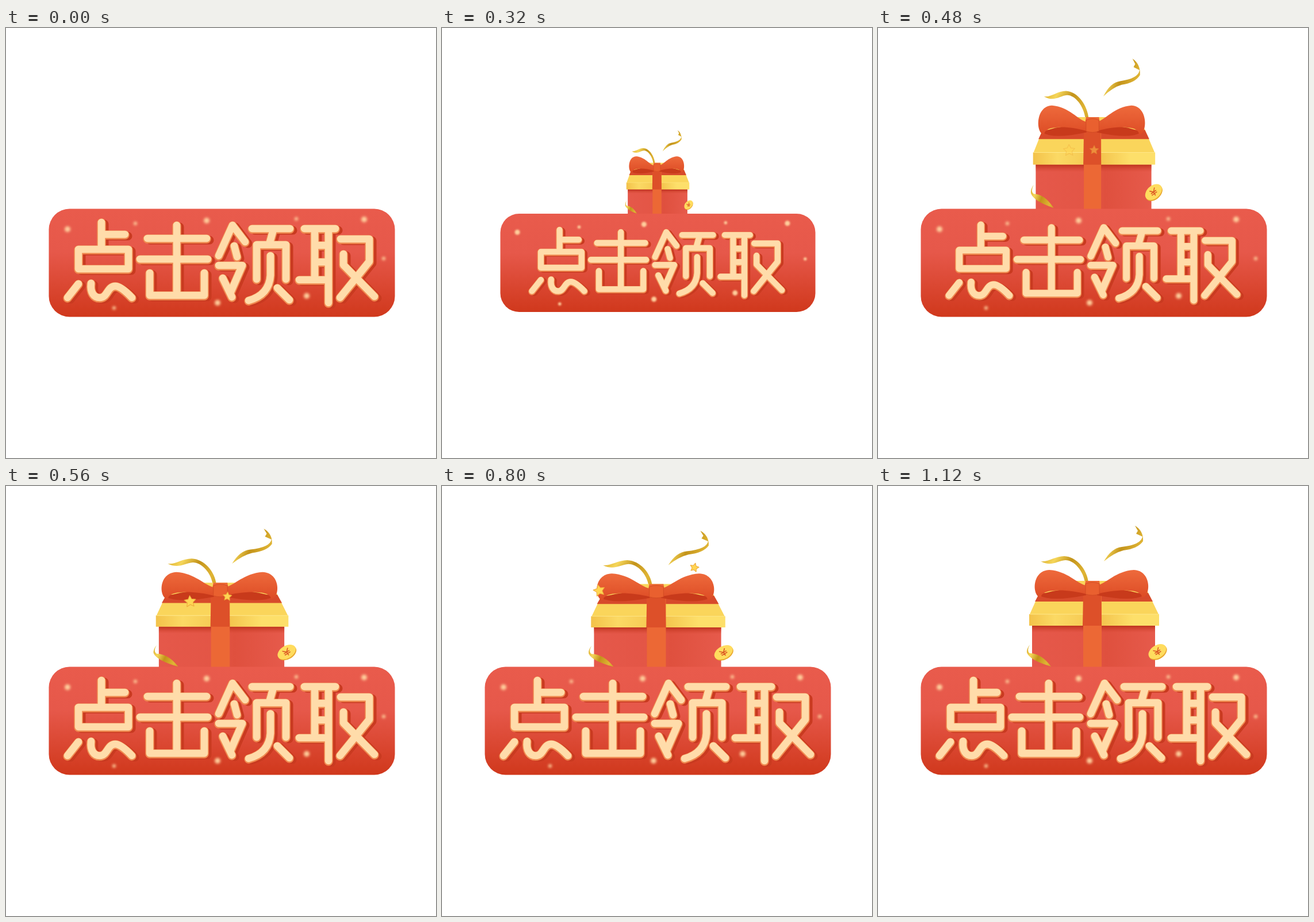
Animation, 748 px wide and 748 px high, one loop 1640 ms. Source, as an HTML page:

```html
<!DOCTYPE html>
<html lang="zh">
<head>
<meta charset="utf-8">
<title>点击领取</title>
<style>
  html, body { margin: 0; width: 100%; height: 100%; overflow: hidden; background: #fff; }
  svg { display: block; width: 100vw; height: 100vh; }
  .strokes { fill: none; stroke-linecap: round; stroke-linejoin: round; }
</style>
</head>
<body>
<svg viewBox="0 0 748 748" role="img" aria-label="点击领取">
  <defs>
    <linearGradient id="panel" x2="0" y2="1">
      <stop stop-color="#e95b4c"/>
      <stop offset=".4" stop-color="#e6584a"/>
      <stop offset="1" stop-color="#d0381c"/>
    </linearGradient>
    <linearGradient id="body">
      <stop stop-color="#e5584a"/>
      <stop offset=".5" stop-color="#e35545"/>
      <stop offset=".6" stop-color="#df503e"/>
      <stop offset="1" stop-color="#e65a4b"/>
    </linearGradient>
    <linearGradient id="lidShade" x2="0" y2="1">
      <stop stop-color="#b9301a" stop-opacity=".9"/>
      <stop offset="1" stop-color="#d0402a" stop-opacity="0"/>
    </linearGradient>
    <linearGradient id="lid">
      <stop stop-color="#f3c24a"/>
      <stop offset=".2" stop-color="#fbd964"/>
      <stop offset=".55" stop-color="#f3c44d"/>
      <stop offset=".8" stop-color="#fddf6a"/>
    </linearGradient>
    <linearGradient id="loop" x2="0" y2="1">
      <stop stop-color="#ee6a3c"/>
      <stop offset="1" stop-color="#dd4c25"/>
    </linearGradient>
    <linearGradient id="gold" x2="1" y2=".4" spreadMethod="reflect">
      <stop stop-color="#d9a928"/>
      <stop offset=".3" stop-color="#f5d65a"/>
      <stop offset=".6" stop-color="#c3931a"/>
      <stop offset="1" stop-color="#e0b535"/>
    </linearGradient>
    <filter id="soft" filterUnits="userSpaceOnUse" x="75" y="315" width="601" height="187">
      <feGaussianBlur stdDeviation="2"/>
    </filter>

    <g id="bowLoop">
      <path fill="#c83a1b" d="M362 184Q320 174 280 190Q300 202 362 190Z"/>
      <path fill="url(#loop)" d="M362 173C346 170 330 148 298 146C266 147 268 194 284 194C282 178 330 179 362 188Z"/>
    </g>

    <g id="glows">
      <path stroke-width="10" d="M107 350h0M349 335h0M623 333h0M523 466h0M368 478h0"/>
      <path stroke-width="6" d="M225 340h0M505 332h0M657 401h0M188 487h0"/>
    </g>

    <g id="lettering">
      <path d="M166 338V384M166 359H207M126 385H213V419H126ZM126 445L107 469M148 444C146 460 153 469 163 469C177 469 176 449 190 449Q200 449 219 469"/>
      <path d="M246 366H349M233 402H351M297 343V465M250 426V465H345V426"/>
      <path d="M370 396L394 343L416 372M397 379L402 398M370 413H411L391 459M377 435L393 468M428 349H494M465 351L458 376M436 437V377H487V437M460 396V430Q458 464 422 474M472 452L493 473"/>
      <path d="M519 349H573M537 349V437M561 349V478M537 378H561M537 407H561M510 438H561M582 367H632V406L581 469M587 393V412L641 467"/>
    </g>
  </defs>

  <g id="gift">
    <rect x="268" y="238" width="214" height="110" fill="url(#body)"/>
    <rect x="268" y="243" width="214" height="12" fill="url(#lidShade)"/>
    <path fill="url(#gold)" d="M283 131C296 133 308 122 324 122C346 123 364 146 366 168H360C357 147 341 129 326 129C312 130 302 141 283 131Z"/>
    <path fill="#fad55b" d="M290 165H460L488 223H264Z"/>
    <path fill="#d74a2b" d="M281 186H470L478 201H273Z"/>
    <rect x="263" y="223" width="226" height="20" fill="url(#lid)"/>
    <path stroke="#ffe889" d="M264 223H488"/>
    <path fill="#ec6835" d="M361 165H385L389 190V348H357V190Z"/>
    <path fill="#dd5029" d="M357 188H388L389 243H356Z"/>
    <use href="#bowLoop"/>
    <use href="#bowLoop" transform="matrix(-1 0 0 1 743 0)"/>
    <path fill="#e9602f" stroke="#cf4a22" stroke-width=".8" d="M361 170Q373 165 385 170V188Q373 192 361 188Z"/>
    <path fill="url(#gold)" d="M393 131Q406 108 424 106Q458 102 460 88L449 83L452 78L447 69Q462 78 461 96Q452 109 427 112Q411 116 393 131Z"/>
    <path fill="url(#gold)" d="M264 276Q258 287 264 291Q284 291 301 314Q264 303 259 290Q258 284 264 276Z"/>
    <g transform="translate(486 288) rotate(-33)">
      <ellipse cy="2" rx="17" ry="11" fill="#e9a72e"/>
      <ellipse rx="17" ry="11" fill="#ffdc5e"/>
      <path class="strokes" stroke="#dc5a25" stroke-width="1.600" d="M-5 -5L0 0L5 -5M0 0V6M-5 0H5M-5 3H5"/>
    </g>
  </g>

  <g id="stars" fill="#ffd553" stroke="#eda83a" stroke-linejoin="round"></g>

  <g id="button">
    <rect x="74.500" y="314.500" width="602" height="188" rx="36" fill="url(#panel)"/>
    <g class="strokes" stroke="#ffcf9c" filter="url(#soft)"><use href="#glows"/></g>
  </g>

  <g id="text" class="strokes">
    <use href="#lettering" x="5" y="3" stroke="#c93a20" stroke-width="15"/>
    <use href="#lettering" y="1" stroke="#f08a50" stroke-width="15.500"/>
    <use href="#lettering" stroke="#ffdcaa" stroke-width="12.500"/>
  </g>
</svg>
<script>
const LOOP = 1640, STEP = 40, BURST = 440, SETTLED = 1120;
const byId = id => document.getElementById(id);
const clamp = u => Math.max(0, Math.min(1, u));
const ramp = (t, from, to) => clamp((t - from) / (to - from));

// Shrinks until `low`, stays until `rise`, is back at full size at `end`.
const dip = (t, depth, low, rise, end) =>
  1 - depth * (ramp(t, 0, low) - ramp(t, rise, end));

function scaleAbout(node, x, y, sx, sy = sx) {
  node.setAttribute('transform',
    `translate(${x} ${y}) scale(${sx} ${sy}) translate(${-x} ${-y})`);
}

function addStar(radius) {
  const star = document.createElementNS('http://www.w3.org/2000/svg', 'polygon');
  const points = Array.from({ length: 10 }, (_, i) => {
    const r = i % 2 ? radius / 2 : radius, a = i * Math.PI / 5;
    return [r * Math.sin(a), -r * Math.cos(a)];
  });
  star.setAttribute('points', points.join(' '));
  return byId('stars').appendChild(star);
}

// Each star is thrown from a point with a velocity and a constant pull.
const stars = [
  { node: addStar(10.5), from: [338, 220], speed: [-90, -125], pull: [-60, 100], spin: -25 },
  { node: addStar(8), from: [373, 223], speed: [40, -185], pull: [160, 60], spin: 25 }
];

function drawStar({ node, from, speed, pull, spin }, u) {
  const [x, y] = from.map((p, k) => p + speed[k] * u + pull[k] * u * u);
  node.setAttribute('transform', `translate(${x} ${y}) rotate(${spin * u})`);
  node.setAttribute('opacity', clamp(Math.min(8 * u, 2.2 * (1 - u))));
}

function drawGift(t) {
  const grow = ramp(t, 180, 440), squash = ramp(t, 440, 640), settle = ramp(t, 640, 880);
  const bounce = .2 * squash - .1 * settle;
  byId('gift').style.display = grow > 0 ? '' : 'none';
  scaleAbout(byId('gift'), 375, 340 - 8 * grow, .9 * grow + bounce, 1.1 * grow - bounce);
}

function draw(t) {
  scaleAbout(byId('button'), 375.5, 408.5, dip(t, .112, 200, 280, 480));
  scaleAbout(byId('text'), 373, 408, dip(t, .186, 320, 320, 560));
  drawGift(t);
  stars.forEach(star => drawStar(star, ramp(t, BURST, SETTLED)));
}

const start = performance.now();
function tick() {
  const t = (performance.now() - start) % LOOP;
  draw(Math.floor(t / STEP) * STEP);
  requestAnimationFrame(tick);
}
tick();
</script>
</body>
</html>
```
